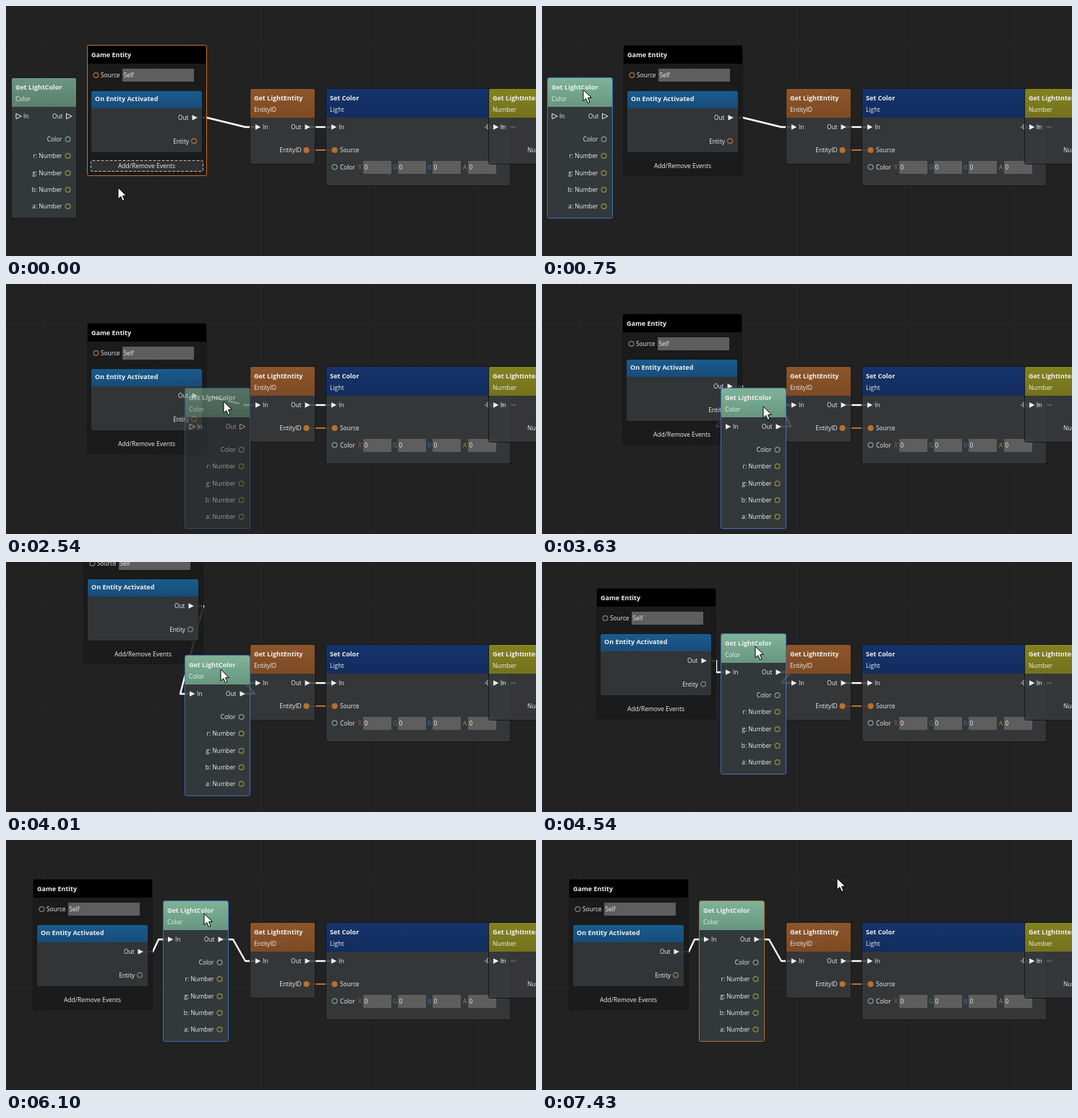
Recreate the animation shown at these times as an HTML page with a canvas. Size 733 px wide and 347 px high, loop 8270 ms.

```html
<!DOCTYPE html>
<html lang="en">
<head>
<meta charset="utf-8">
<title>Node graph</title>
<style>
html, body { margin: 0; width: 100%; height: 100%; overflow: hidden; background: #222; }
canvas { display: block; }
</style>
</head>
<body>
<canvas id="stage" width="733" height="347"></canvas>
<script>
const g = document.getElementById('stage').getContext('2d');
const LOOP = 8270, PRESS = 520, GHOST = 2150, DROP = 3550, RELEASE = 6300;
const LAG = 220, GRID = 15;
const WHITE = '#f0f0f0', EDGE = '#181818', ORANGE = '#b87030', YELLOW = '#9a9236', TEAL = '#7f9f98';

// Each leg eases to a point: [start, end, x, y]
const cursorLegs = [
  [70, 600, 57, 116], [1050, 1840, 266, 124], [1840, 2400, 301, 163],
  [3480, 3620, 306, 170], [3620, 3790, 297, 149], [4010, 4400, 295, 117],
  [4600, 5250, 278, 101], [5310, 5700, 274, 102], [6400, 6720, 408, 53]
];
const entityLegs = [
  [DROP, 3900, 108, -39], [4010, 4540, 76, 37], [4540, 5250, 53, 55], [5310, 6180, 38, 55]
];

function travel(x, y, legs, t) {
  for (const [from, to, toX, toY] of legs) {
    const u = Math.min(Math.max((t - from) / (to - from), 0), 1), s = u * u * (3 - 2 * u);
    x += (toX - x) * s;
    y += (toY - y) * s;
  }
  return [Math.round(x), Math.round(y)];
}

const cursorAt = t => travel(155, 252, cursorLegs, t);
const entityAt = t => travel(113, 55, entityLegs, t);
const snap = (v, origin) => origin + GRID * Math.round((v - origin) / GRID);

// The dragged node trails the cursor and snaps to the grid
function lightAt(t) {
  const [x, y] = cursorAt(Math.min(Math.max(t - LAG, 1050), RELEASE));
  return [snap(x - 49, 8), snap(y - 16, 100)];
}

function text(s, x, y, { size = 8.3, bold, color = WHITE, align = 'left' } = {}) {
  g.font = `${bold ? 'bold ' : ''}${size}px "Open Sans", "Noto Sans", sans-serif`;
  g.textAlign = align;
  g.fillStyle = color;
  g.fillText(s, x, Math.round(y + 3));
}

function box(x, y, w, h, fill, r = 2) {
  g.fillStyle = fill;
  g.beginPath();
  g.roundRect(x, y, w, h, r);
  g.fill();
}

function outline(x, y, w, h, color) {
  g.strokeStyle = color;
  g.lineWidth = 1;
  g.beginPath();
  g.roundRect(x - 0.5, y - 0.5, w + 1, h + 1, 2);
  g.stroke();
}

function panel(x, y, w, h, head, [top, bottom], body = 'rgba(55,58,60,.86)', border = EDGE) {
  const shade = g.createLinearGradient(0, y, 0, y + head);
  shade.addColorStop(0, top);
  shade.addColorStop(1, bottom);
  box(x, y + head, w, h - head, body, [0, 0, 2, 2]);
  box(x, y, w, head, shade, [2, 2, 0, 0]);
  outline(x, y, w, h, border);
}

function arrow(x, y, filled = true) {
  g.beginPath();
  g.moveTo(x, y - 3.7);
  g.lineTo(x + 7.3, y);
  g.lineTo(x, y + 3.7);
  g.closePath();
  g.fillStyle = g.strokeStyle = WHITE;
  g.lineWidth = 1;
  filled ? g.fill() : g.stroke();
}

function dot(x, y, color, filled) {
  g.beginPath();
  g.arc(x, y, filled ? 4 : 3.4, 0, 7);
  g.fillStyle = g.strokeStyle = color;
  g.lineWidth = 1.2;
  filled ? g.fill() : g.stroke();
}

function titles(x, y, title, sub = '') {
  text(title, x + 5, y + 13, { size: 9, bold: true });
  text(sub, x + 5, y + 29, { size: 8.5 });
}

function flowIn(x, y, filled) {
  arrow(x + 7, y, filled);
  text('In', x + 17, y);
}

function flowOut(right, y, filled) {
  text('Out', right - 18.5, y, { align: 'right' });
  arrow(right - 13.5, y, filled);
}

function wire(points, color = '#fff', width = 2.4) {
  g.strokeStyle = color;
  g.lineWidth = width;
  g.lineJoin = 'round';
  g.beginPath();
  points.forEach(p => g.lineTo(...p));
  g.stroke();
}

function field(x, y, w, value) {
  box(x, y, w, 18, '#5e5e5e', 1);
  text(value, x + 1.5, y + 9);
}

function drawGrid() {
  g.fillStyle = '#222';
  g.fillRect(0, 0, 733, 347);
  g.fillStyle = '#272727';
  for (let x = 52; x < 733; x += 10 * GRID) g.fillRect(x, 0, 1, 347);
  for (let y = 55; y < 347; y += 10 * GRID) g.fillRect(0, y, 733, 1);
}

function drawEntity(x, y, selected, port) {
  panel(x, y, 164, 180, 25, ['#000', '#000'], 'rgba(27,27,27,.88)', selected ? '#c47030' : EDGE);
  titles(x, y, 'Game Entity');
  dot(x + 11.5, y + 41, port);
  text('Source', x + 18, y + 41);
  field(x + 48, y + 32, 99, 'Self');
  panel(x + 5, y + 63, 153, 85, 24, ['#195c8e', '#184b78'], 'rgba(54,57,60,.88)');
  titles(x + 5, y + 61, 'On Entity Activated');
  flowOut(x + 158, y + 100);
  text('Entity', x + 140, y + 133, { align: 'right' });
  dot(x + 147, y + 132.5, port);
  if (selected) {
    box(x + 5, y + 160, 154, 15, '#303030');
    g.setLineDash([4, 2]);
    outline(x + 5, y + 160, 154, 14, '#bbb');
    g.setLineDash([]);
  }
  text('Add/Remove Events', x + 81.5, y + 167, { size: 8.5, align: 'center' });
}

function drawLight(x, y, border, linked, ghost) {
  g.globalAlpha = ghost ? 0.55 : 1;
  const tones = border === EDGE ? ['#6c9684', '#587f6c'] : ['#7fb398', '#679680'];
  panel(x, y, 89, 194, 40, tones, 'rgba(54,59,61,.9)', border);
  titles(x, y, 'Get LightColor', 'Color');
  flowIn(x - 1, y + 53, linked);
  flowOut(x + 89, y + 53, linked);
  ['Color', 'r: Number', 'g: Number', 'b: Number', 'a: Number'].forEach((label, i) => {
    const row = y + 85 + Math.round(i * 23.3);
    text(label, x + 69.5, row, { align: 'right' });
    dot(x + 77.5, row, i ? YELLOW : TEAL);
  });
  g.globalAlpha = 1;
}

function drawLightEntity() {
  panel(338, 115, 89, 104, 40, ['#8d562c', '#7d4a24']);
  titles(338, 115, 'Get LightEntity', 'EntityID');
  flowIn(338, 168);
  flowOut(427, 168);
  text('EntityID', 408.5, 200, { align: 'right' });
  dot(415.5, 200, ORANGE, true);
}

function drawSetColor() {
  panel(443, 115, 254, 134, 40, ['#15346c', '#122c5e']);
  titles(443, 115, 'Set Color', 'Light');
  flowIn(443, 168);
  flowOut(697, 168);
  dot(454.5, 200, ORANGE, true);
  text('Source', 462, 200);
  dot(454.5, 223.5, TEAL);
  text('Color', 462, 224);
  ['#a3552c', '#4c8a70', '#3d72a8', YELLOW].forEach((color, i) => {
    const x = 494 + Math.round(i * 48.2);
    text('RGBA'[i], x - 7, 224, { color });
    field(x, 215, 39, '0');
  });
}

function drawIntensity() {
  panel(668, 115, 120, 104, 40, ['#83821f', '#73721c']);
  titles(668, 115, 'Get LightIntensity', 'Number');
  flowIn(667, 168);
  text('Number', 721, 200);
}

function drawCursor(x, y) {
  g.beginPath();
  [[0, 0], [0, 16], [3.8, 12.6], [6.4, 18.6], [9, 17.4], [6.5, 11.6], [11.3, 11.3]]
    .forEach(([dx, dy]) => g.lineTo(x + dx, y + dy));
  g.closePath();
  g.fillStyle = '#fff';
  g.strokeStyle = '#000';
  g.lineWidth = 1;
  g.fill();
  g.stroke();
}

function draw(t) {
  const [ex, ey] = entityAt(t), [lx, ly] = lightAt(t);
  const linked = t >= DROP, ghost = t >= GHOST && !linked;
  const start = [[ex + 151, ey + 100], [ex + 165, ey + 100]], end = [[331, 168], [345, 168]];

  drawGrid();
  if (linked) {
    wire([...start, [lx - 7, ly + 53], [lx + 7, ly + 53]]);
    wire([[lx + 82, ly + 53], [lx + 96, ly + 53], ...end]);
  } else {
    if (ghost) {
      g.setLineDash([16, 6]);
      g.lineDashOffset = -(Math.min(t, 3300) - 2540) * 0.03;
    }
    wire([...start, ...end], ghost ? '#858585' : '#fff');
    g.setLineDash([]);
  }
  wire([[420, 168], [450, 168]]);
  wire([[416, 200], [454, 200]], ORANGE, 2);
  wire([[661, 168], [705, 168]]);

  drawLightEntity();
  drawSetColor();
  drawIntensity();
  drawEntity(ex, ey, t < 300, linked ? '#8a8068' : ORANGE);
  drawLight(lx, ly, t < PRESS ? EDGE : t < 6480 ? '#3f70b5' : '#a5713a', linked, ghost);
  drawCursor(...cursorAt(t));
}

function frame(now) {
  draw(now % LOOP);
  requestAnimationFrame(frame);
}
requestAnimationFrame(frame);
</script>
</body>
</html>
```
